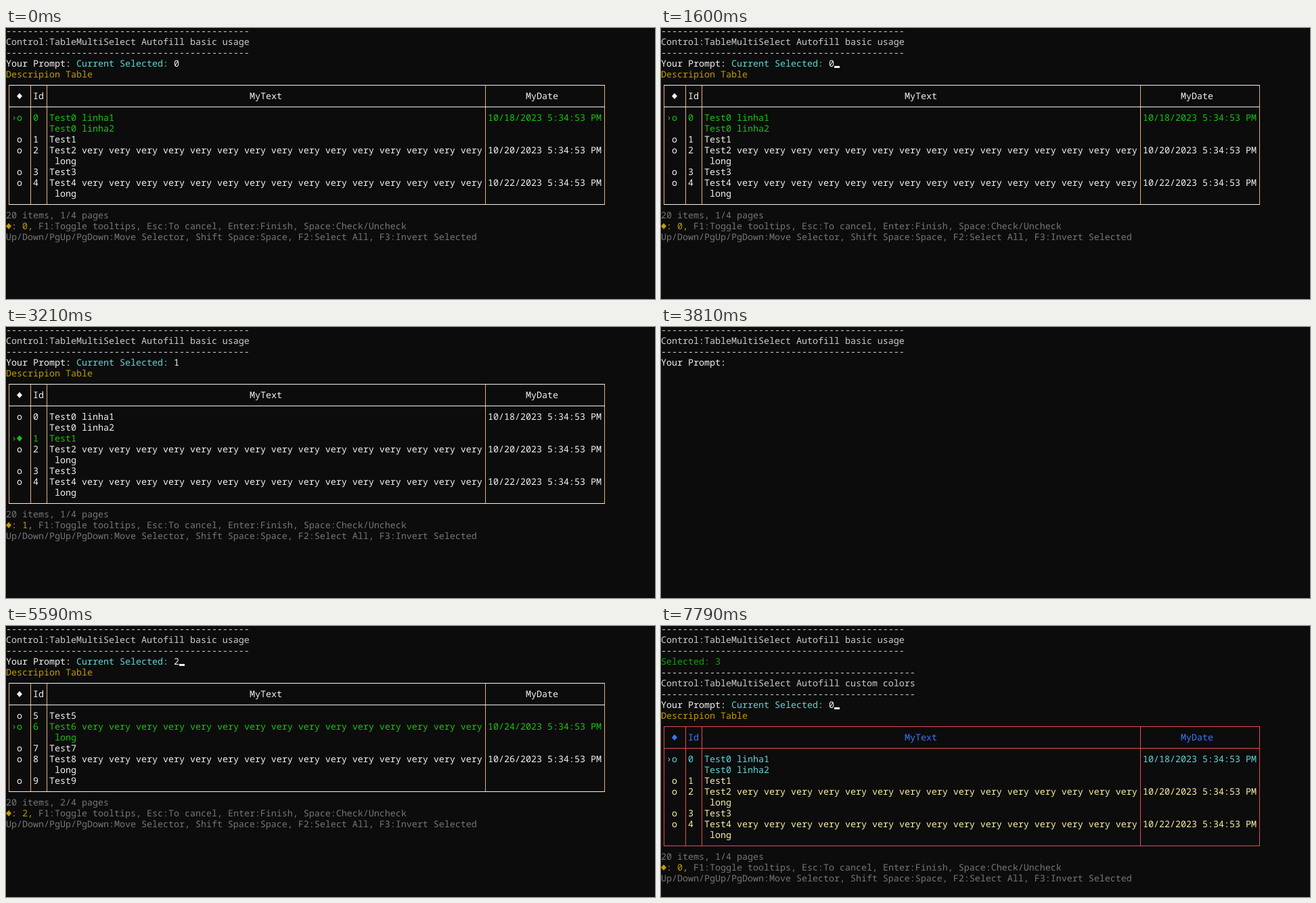
Animation of 959x400 px, one loop 8000 ms. Source, as an HTML page:

```html
<!DOCTYPE html>
<html lang="en">
<head>
<meta charset="utf-8">
<title>Table multi select</title>
<style>
  html, body { margin: 0; width: 100%; height: 100%; overflow: hidden; background: #0c0c0c; }
  svg { display: block; }
  text {
    font: 13.333px "Noto Sans Mono", "DejaVu Sans Mono", monospace;
    white-space: pre;
    text-rendering: geometricPrecision;
  }
</style>
</head>
<body>
<svg id="screen" width="959" height="400" viewBox="0 0 959 400"></svg>
<script>
const LOOP = 8000, COL = 8, LINE = 16;
const WHITE = '#f2f2f2', SILVER = '#cccccc', GRAY = '#767676', CYAN = '#61d6d6';
const GOLD = '#c19c00', GREEN = '#16c60c', DARK_GREEN = '#13a10e';

const plain = { rule: WHITE, edge: '#e6b07c', head: WHITE, row: WHITE, active: GREEN };
const custom = { rule: '#e74856', edge: '#e74856', head: '#3b78ff', row: '#f9f1a5', active: CYAN };

// Each step changes some of the state from its time on.
const steps = [
  [0, { active: 0, checked: [], cursor: false, cleared: false, second: false }],
  [600, { cursor: true }],
  [1010, { cursor: false }],
  [1600, { cursor: true }],
  [2000, { cursor: false }],
  [2610, { active: 1 }],
  [3010, { checked: [1] }],
  [3410, { active: 2 }],
  [3810, { checked: [1, 2], cleared: true }],
  [4200, { cleared: false }],
  [4400, { active: 3 }],
  [4800, { active: 4 }],
  [5190, { active: 5 }],
  [5390, { active: 6 }],
  [5590, { cursor: true }],
  [6000, { cursor: false }],
  [6200, { checked: [1, 2, 6] }],
  [6800, { cursor: true }],
  [7390, { cursor: false }],
  [7790, { active: 0, checked: [], cursor: true, second: true }]
];

const put = (col, line, str, color) =>
  `<text x="${col * COL}" y="${line * LINE + 9}" fill="${color}">${str}</text>`;

const rect = (x, y, w, h, color) =>
  `<rect x="${x}" y="${y}" width="${w}" height="${h}" fill="${color}"/>`;

const diamond = (col, line, color) =>
  `<path d="M${col * COL + 4} ${line * LINE}l4 4.5l-4 4.5l-4-4.5z" fill="${color}"/>`;

function title(line, str) {
  const dashes = '-'.repeat(str.length);
  return put(0, line, dashes, SILVER) + put(0, line + 1, str, SILVER) + put(0, line + 2, dashes, SILVER);
}

function itemLines(id) {
  if (id === 0) return ['Test0 linha1', 'Test0 linha2'];
  if (id % 2) return ['Test' + id];
  return ['Test' + id + ' very'.repeat(15), ' long'];
}

function table(top, state, skin) {
  const first = Math.floor(state.active / 5) * 5;
  let out = diamond(2, top + 1, skin.head) + put(5, top + 1, 'Id', skin.head) +
    put(45, top + 1, 'MyText', skin.head) + put(96, top + 1, 'MyDate', skin.head);
  let line = top + 3;
  for (let id = first; id < first + 5; id++) {
    const on = id === state.active;
    const color = on ? skin.active : skin.row;
    const lines = itemLines(id);
    if (on) out += put(1, line, '›', color);
    out += state.checked.includes(id) ? diamond(2, line, color) : put(2, line, 'o', color);
    out += put(5, line, id, color);
    if (id % 2 === 0) out += put(89, line, `10/${18 + id}/2023 5:34:53 PM`, color);
    for (const str of lines) out += put(8, line++, str, color);
  }
  const y = n => n * LINE + 4;
  for (const col of [0, 4, 7, 88, 110])
    out += rect(col * COL + 4, y(top), 1, y(line) - y(top) + 1, skin.edge);
  for (const n of [top, top + 2, line])
    out += rect(4, y(n), 881, 1, skin.rule);
  return out + footer(line + 1, first / 5 + 1, state.checked.length);
}

function footer(line, page, count) {
  return put(0, line, `20 items, ${page}/4 pages`, GRAY) +
    diamond(0, line + 1, GOLD) + put(1, line + 1, `: ${count},`, GOLD) +
    put(6, line + 1, 'F1:Toggle tooltips, Esc:To cancel, Enter:Finish, Space:Check/Uncheck', GRAY) +
    put(0, line + 2, 'Up/Down/PgUp/PgDown:Move Selector, Shift Space:Space, F2:Select All, F3:Invert Selected', GRAY);
}

function prompt(line, state, skin) {
  let out = put(0, line, 'Your Prompt:', WHITE);
  if (state.cleared) return out;
  out += put(13, line, 'Current Selected:', CYAN) + put(31, line, state.checked.length, WHITE) +
    put(0, line + 1, 'Descripion Table', GOLD) + table(line + 2, state, skin);
  if (state.cursor) out += rect(256, line * LINE + 8, 8, 3, WHITE);
  return out;
}

function render(state) {
  const intro = title(0, 'Control:TableMultiSelect Autofill basic usage');
  if (!state.second) return intro + prompt(3, state, plain);
  return intro + put(0, 3, 'Selected: 3', DARK_GREEN) +
    title(4, 'Control:TableMultiSelect Autofill custom colors') + prompt(7, state, custom);
}

const screen = document.getElementById('screen');
const start = performance.now();
let shown = -1;

function tick() {
  const t = (performance.now() - start) % LOOP;
  const count = steps.filter(([at]) => at <= t).length;
  if (count !== shown) {
    shown = count;
    screen.innerHTML = render(Object.assign({}, ...steps.slice(0, count).map(([, change]) => change)));
  }
  requestAnimationFrame(tick);
}
tick();
</script>
</body>
</html>
```
